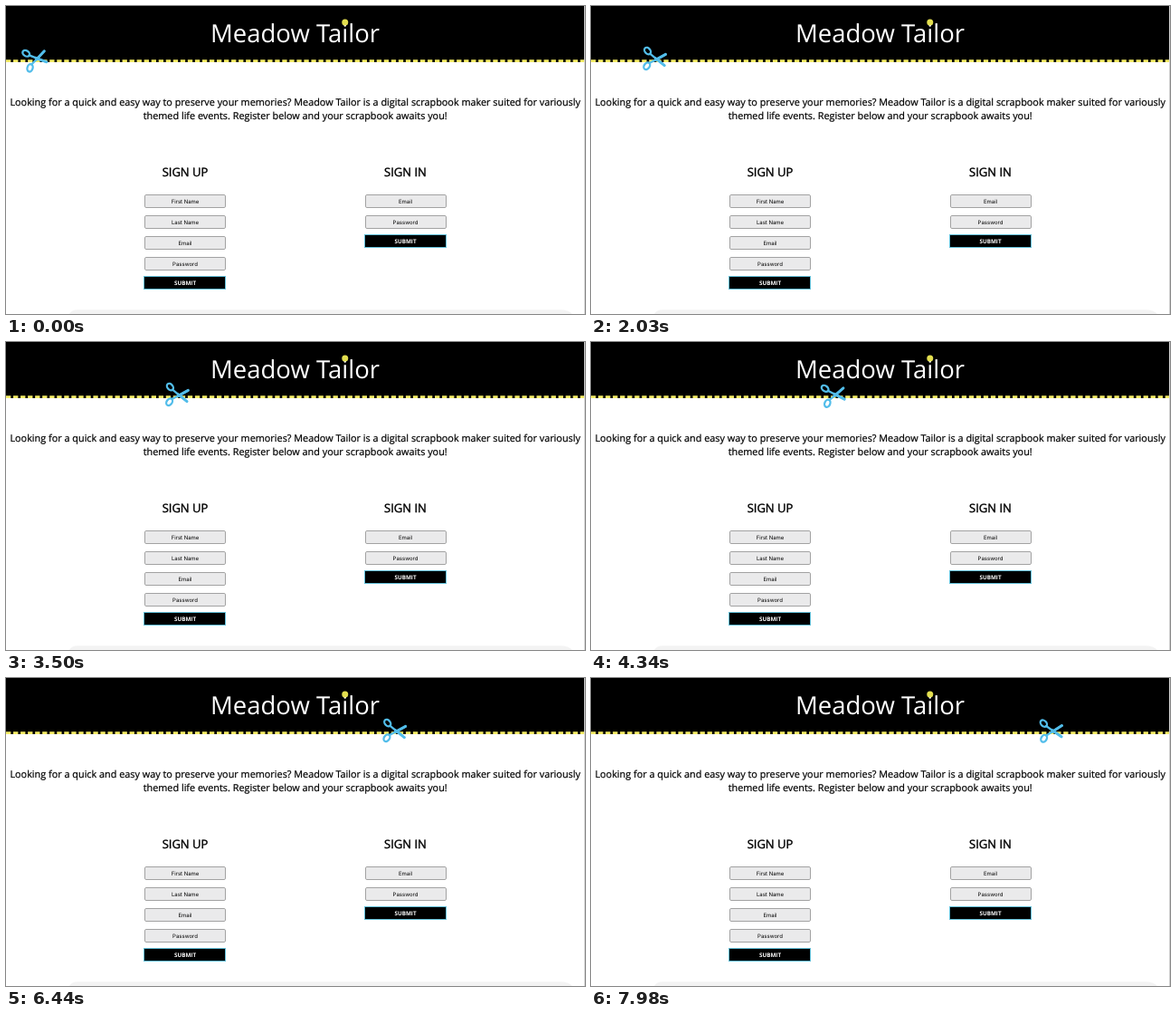
Animation of 640 by 340 pixels, one loop 8 s. Source, as an HTML page:

```html
<!DOCTYPE html>
<html lang="en">
<head>
<meta charset="utf-8">
<title>Meadow Tailor</title>
<style>
  html, body { margin: 0; width: 100%; height: 100%; overflow: hidden; background: #fff; }
  svg { display: block; width: 640px; height: 340px; font-family: "Open Sans", sans-serif; }
  text { text-anchor: middle; text-rendering: geometricPrecision; }
  .logo { font-size: 27.5px; fill: #fff; }
  .intro { font-size: 10.85px; stroke: #000; stroke-width: .22; }
  .heading { font-size: 13px; stroke: #000; stroke-width: .4; }
  .field { fill: #eaeaeb; stroke: #a2a2a2; }
  .label { font: 6px Inter, sans-serif; }
  .button { fill: #000; stroke: #62bfd8; }
  .submit { font-size: 6.3px; font-weight: 700; fill: #fff; }
  #scissors { fill: none; stroke: #52bdea; stroke-width: 2.3; stroke-linecap: round; }
</style>
</head>
<body>
<svg viewBox="0 0 640 340">
  <rect width="640" height="62"/>
  <path d="M0 60.6H640" stroke="#f4ec66" stroke-width="2.7" stroke-dasharray="5.33 2.704"/>
  <text class="logo" x="319.5" y="40">Meadow Tailor</text>
  <circle id="dot" cx="369" cy="18" r="3.5" fill="#e3df4f"/>

  <text class="intro" x="319.7" y="110">Looking for a quick and easy way to preserve your memories? Meadow Tailor is a digital scrapbook maker suited for variously</text>
  <text class="intro" x="319.7" y="125">themed life events. Register below and your scrapbook awaits you!</text>

  <g id="forms"></g>
  <path d="M70 340Q72 335.3 80 335.3H612Q622 335.3 626 340Z" fill="#f3f3f3"/>
  <path d="M639.5 0V340" stroke="#d2d2d2"/>

  <g id="scissors">
    <ellipse cx="-8.4" cy="8.6" rx="3" ry="4.2" transform="rotate(35 -8.4 8.6)"/>
    <ellipse cx="-7.6" cy="-8" rx="3" ry="4.2" transform="rotate(-40 -7.6 -8)"/>
    <path d="M-5.5 5.5L12.3 -4.2M-5 -5L11 8"/>
    <path d="M1 2L12.3 -4.2M1 0L11 8" stroke-width="3"/>
  </g>
</svg>
<script>
  const LOOP = 8000, STEP = 70;
  const TRAVEL = 15000, TURN = 612;   // one crossing, and the moment it turns at the left
  const SNIP = 740;
  const scissors = document.getElementById("scissors");

  function form(x, title, labels) {
    const center = Math.round(x);
    const fields = labels.map((label, i) => {
      const y = 215.5 + 23 * i;
      return `<rect class="field" x="${center - 44.5}" y="${y - 7}" width="89" height="14" rx="1.4"/>
        <text class="label" x="${x}" y="${y + 2.1}">${label}</text>`;
    });
    const y = 213.5 + 23 * labels.length;
    return `<text class="heading" x="${x}" y="188">${title}</text>${fields.join("")}
      <rect class="button" x="${center - 45.5}" y="${y - 7}" width="90" height="14"/>
      <text class="submit" x="${x}" y="${y + 2.3}">SUBMIT</text>`;
  }

  document.getElementById("forms").innerHTML =
    form(198, "SIGN UP", ["First Name", "Last Name", "Email", "Password"]) +
    form(441.5, "SIGN IN", ["Email", "Password"]);

  // Keep the yellow dot centred on the "i" of the title.
  const title = document.querySelector(".logo");
  const iBox = title.getExtentOfChar(title.textContent.indexOf("i"));
  document.getElementById("dot").setAttribute("cx", iBox.x + iBox.width / 2);

  // cubic-bezier(.25, .1, .25, 1)
  function ease(progress) {
    let low = 0, high = 1;
    for (let i = 0; i < 24; i++) {
      const s = (low + high) / 2;
      if (.75 * s * (1 - s) + s ** 3 < progress) low = s; else high = s;
    }
    const s = low;
    return .3 * s * (1 - s) ** 2 + 3 * s * s * (1 - s) + s ** 3;
  }

  function draw() {
    const t = Math.floor(performance.now() % LOOP / STEP) * STEP;
    const x = 16.5 + 620 * ease(Math.abs(t - TURN) / TRAVEL);
    const angle = -18 * Math.max(0, Math.cos(2 * Math.PI * t / SNIP));
    scissors.setAttribute("transform", `translate(${x} 57.6) rotate(${angle})`);
    requestAnimationFrame(draw);
  }
  draw();
</script>
</body>
</html>
```
